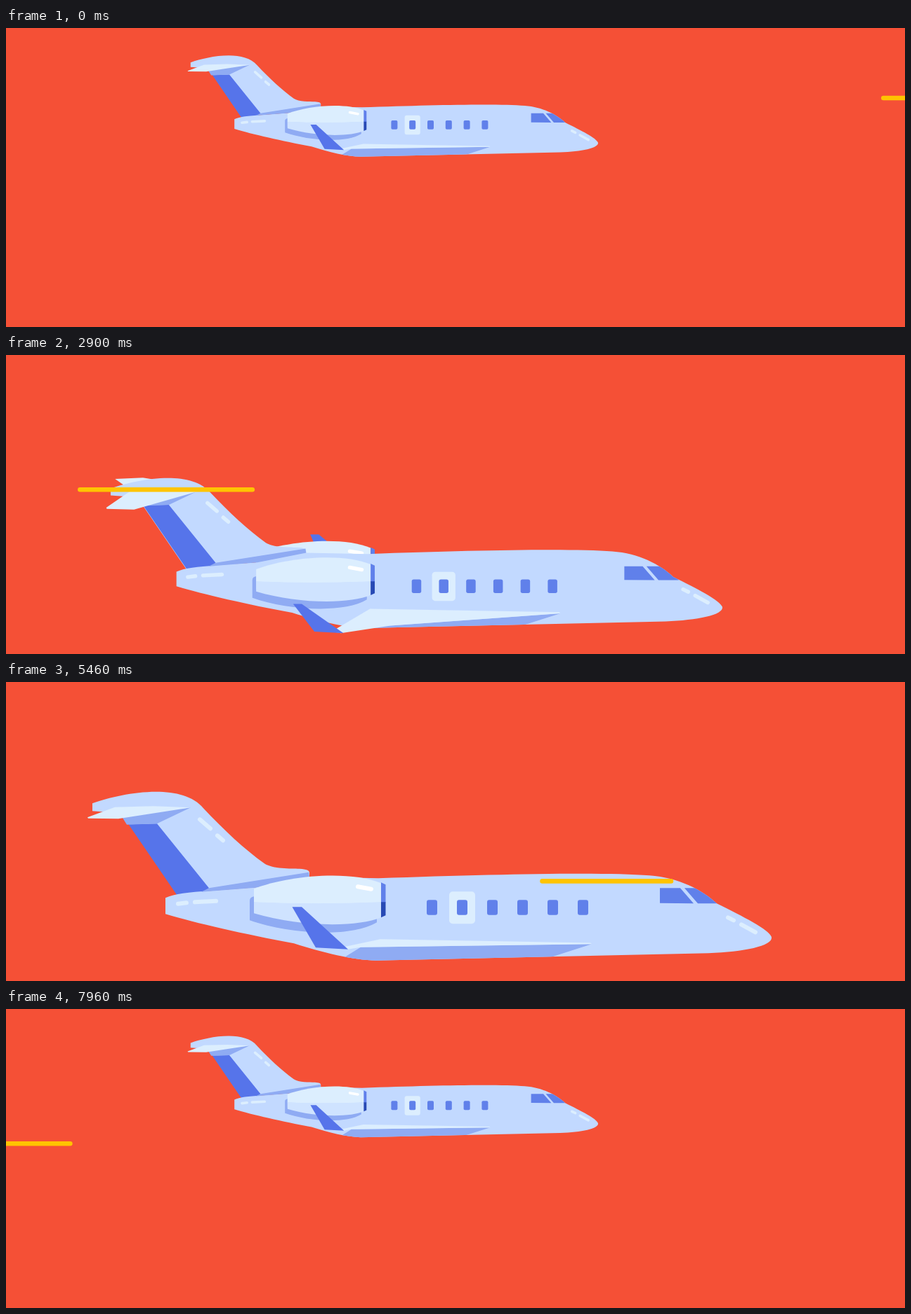
An HTML page with a canvas for the animation above (8 s loop, 1280 px wide and 427 px high).

```html
<!DOCTYPE html>
<html lang="en">
<head>
<meta charset="utf-8">
<title>Jet</title>
<style>
html, body { margin: 0; height: 100%; overflow: hidden; background: #f55036; }
canvas { display: block; width: 100%; height: 100%; }
</style>
</head>
<body>
<canvas id="stage" width="1280" height="427"></canvas>
<script>
const ctx = document.getElementById('stage').getContext('2d');
const LOOP = 8000, FRAME = 100 / 3;
const RED = '#f55036', BODY = '#c2d9ff', LIGHT = '#dceefe', PALE = '#cfe3ff', SHADE = '#8fabf3',
  BLUE = '#5674ea', GLASS = '#6080ea', NAVY = '#2749b4', YELLOW = '#ffc400';

const FIN = new Path2D('M123 176C165 161 250 145 281 183C310 214 340 242 368 262C380 270 405 269 418 269.5' +
  'C428 270 432 272 432 275V283L289 300L244 306L165 190L123 187Z');
const HULL = new Path2D('M227 311C240 305 260 303 290 301L355 296L432 281L530 283C700 277 850 274 916 279' +
  'C958 282 992 300 1012 319C1050 338 1086 356 1090 367C1092 380 1050 388 1000 390L527 400.5' +
  'C495 400 450 389 410 376C340 363 270 347 227 334Z');
const POD_SHADOW = new Path2D('M353 309Q347 310 347 315V343C400 362 490 369 528 346V338L353 330Z');
const POD_TOP = new Path2D('M353 298C400 279 490 271 534 290V317.5Q440 321.5 353 317.5Z');
const POD_BASE = new Path2D('M353 317Q440 321 534 317V339C500 353 420 353 353 333Z');

// Eased 0..1 between two frames
function ramp(f, from, to) {
  const u = Math.min(1, Math.max(0, (f - from) / (to - from)));
  return u * u * (3 - 2 * u);
}

function fill(path, color) {
  ctx.fillStyle = color;
  ctx.fill(path);
}

// Points are [x, y, depth, drop]: banking by r moves them down by depth * r + drop * r²
function poly(points, color, r = 0) {
  const path = new Path2D();
  for (const [x, y, depth = 0, drop = 0] of points) path.lineTo(x, y + depth * r + drop * r * r);
  path.closePath();
  fill(path, color);
}

function box(x, y, w, h, r, color) {
  const path = new Path2D();
  path.roundRect(x, y, w, h, r);
  fill(path, color);
}

function dash(x1, y1, x2, y2, color = LIGHT) {
  ctx.strokeStyle = color;
  ctx.lineWidth = 6;
  ctx.lineCap = 'round';
  ctx.beginPath();
  ctx.moveTo(x1, y1);
  ctx.lineTo(x2, y2);
  ctx.stroke();
}

function shifted(dx, dy, draw) {
  ctx.save();
  ctx.translate(dx, dy);
  draw();
  ctx.restore();
}

function onHull(draw) {
  ctx.save();
  ctx.clip(HULL);
  draw();
  ctx.restore();
}

function pod() {
  fill(POD_TOP, LIGHT);
  fill(POD_BASE, PALE);
  poly([[534, 289], [540.5, 292], [540.5, 318], [534, 318]], GLASS);
  poly([[534, 317], [540.5, 317], [540.5, 336], [534, 339]], NAVY);
  dash(501, 295, 520, 298.5, '#fff');
}

// Far tailplane, winglet and engine rise into view as the near side dips
function farSide(r) {
  if (r <= 0) return;
  poly([[130, 180, -16], [174, 176, -14], [193, 175, -10], [147, 183, -7]], LIGHT, r);
  poly([[438.5, 287, -35], [452, 287, -35], [470, 302, -35], [445, 302, -35]], BLUE, r);
  shifted(0, -16.5 * r, pod);
}

function tail(r) {
  shifted(0, 3 * Math.abs(r), () => {
    fill(FIN, BODY);
    dash(276, 199, 291, 212);
    dash(301, 222, 309, 229);
  });
  poly([[169, 198], [175, 206], [215, 205], [289, 297], [280, 306], [244, 308]], BLUE);
  poly([[164, 193.5], [263, 182], [215, 205], [172, 206.5]], SHADE);
  poly([[116, 196, 13.5], [155, 181.5, 1], [210, 180, 1], [263, 182, 1],
    [160, 198, 14.5], [117, 197.5, 14]], LIGHT, r);
}

function wing(r) {
  const under = [505 + 60 * r * r, 381.5, 15], tip = [832, 375.3], edge = [834, 377];
  onHull(() => poly([[480, 397], under, edge, [775 + 70 * Math.min(r, 0), 396], [527, 402]], SHADE, r));
  poly([[472, 383, 23], [533, 370], tip, edge, under, [487, 384.5, 24]], LIGHT, r);
  shifted(4 * r, 0, () =>
    poly([[407.5, 324, 28, 10], [421, 324, 28, 10], [487, 384.5, 24], [441, 382, 24]], BLUE, r));
}

function plane(r) {
  farSide(r);
  tail(r);
  fill(HULL, BODY);
  poly([[278, 302.5], [289, 297], [431, 274.5], [432, 281], [355, 296.5]], SHADE);
  dash(245, 319.5, 257, 318);
  dash(269, 317, 299, 315.5);
  shifted(0, 9.3 * r, () => {
    fill(POD_SHADOW, SHADE);
    pod();
    box(631, 302, 37, 46, 5, LIGHT);
    for (let i = 0; i < 6; i++) box(599 + 43 * i, 314, 15, 21.5, 3, GLASS);
  });
  wing(r);
  onHull(() => shifted(4 * Math.abs(r), 5.5 * r, () => {
    poly([[931, 297], [960, 297], [979, 319], [931, 318.5]], GLASS);
    poly([[966, 297], [997, 297], [1017, 319], [985, 319]], GLASS);
  }));
  shifted(0, 2.5 * (r - Math.abs(r)), () => {
    dash(1028, 339, 1036, 343);
    dash(1047, 349, 1067, 360);
  });
}

// Five lines in turn cross the stage, ten frames each
function speedLine(phase) {
  const lane = [0, 2, 0, 1, 3][Math.floor(phase / 10)];
  const length = phase < 20 ? 190 : 252;
  const right = 1436 - 1380 * ramp(phase % 10, 0, 10);
  box(right - length, 96.7 + 92.2 * lane, length, 6.6, 3.3, YELLOW);
}

function draw(f) {
  const phase = f % 50;
  const near = ramp(f, 60, 100) - ramp(f, 180, 220), scale = 0.6 + 0.4 * near;
  const y = 105.1 + 189 * ramp(f, 56, 94) - 16.5 * ramp(f, 94, 125)
    + 6.5 * ramp(f, 145, 170) - 179 * ramp(f, 170, 216);
  const bob = 8 * Math.cos((phase - 45) / 50 * 2 * Math.PI);
  const roll = 1.24 * (ramp(f, 60, 80) - ramp(f, 80, 105)) - ramp(f, 170, 190) + ramp(f, 190, 220);
  ctx.fillStyle = RED;
  ctx.fillRect(0, 0, 1280, 427);
  ctx.save();
  ctx.translate(553.2 + 53.8 * near ** 1.85, y + bob);
  ctx.scale(scale, scale);
  ctx.translate(-607, -280);
  plane(roll);
  ctx.restore();
  speedLine(phase);
}

function tick() {
  const t = Math.floor(performance.now() % LOOP / 10) * 10;
  draw(Math.floor((t + 7) / FRAME));
  requestAnimationFrame(tick);
}
tick();
</script>
</body>
</html>
```
